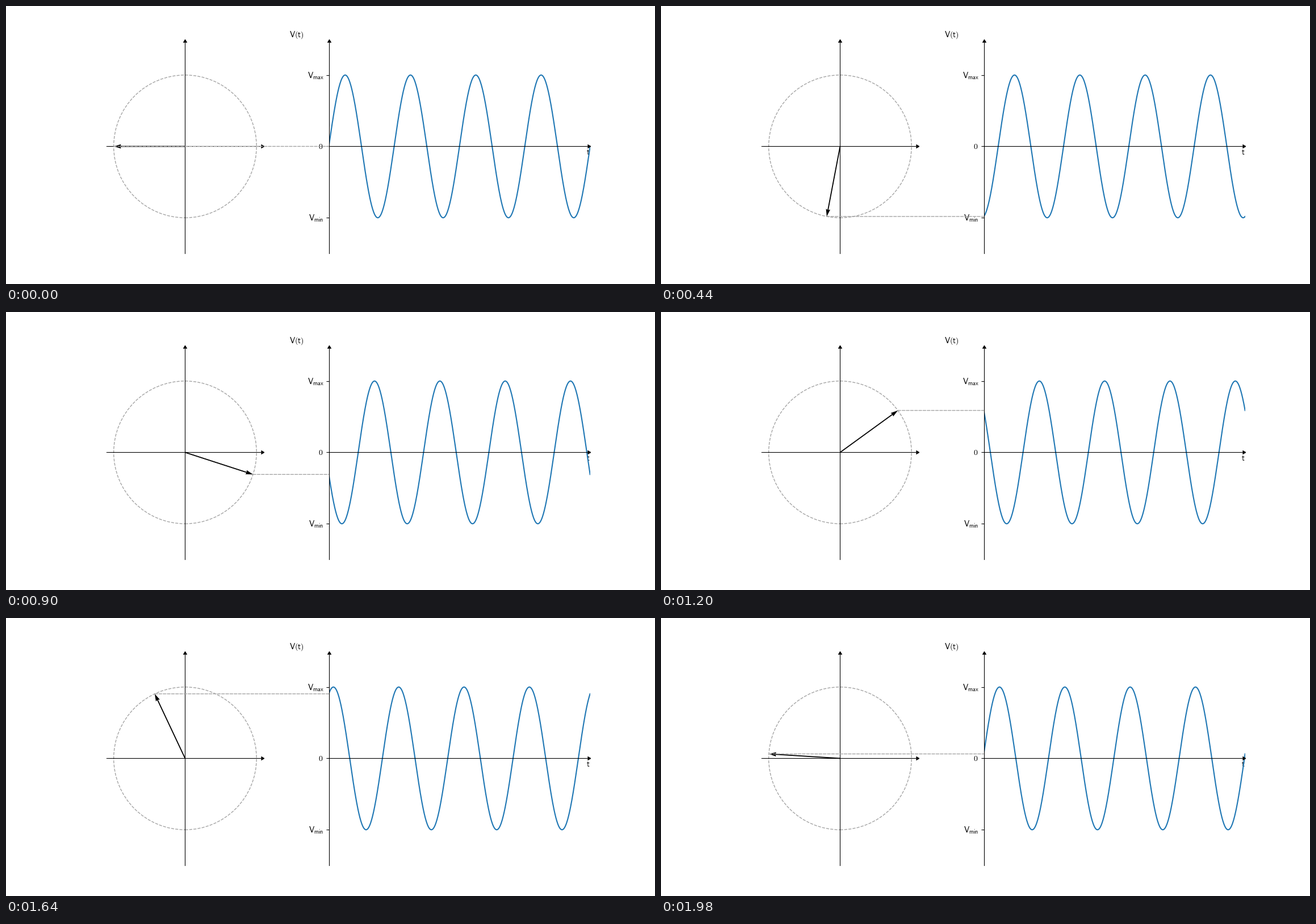
Write a matplotlib script that moves like this. It is 1143 px wide and 490 px high and loops after 2 s.

```python
import numpy as np
import matplotlib.pyplot as plt
from matplotlib.animation import FuncAnimation
from matplotlib.patches import Circle, ConnectionPatch

W, H, DPI = 1143, 490, 100
FRAMES, INTERVAL = 100, 20
PERIODS = 4
GRAY = "#a5a5a5"

fig, (left, right) = plt.subplots(
    ncols=2, figsize=(W / DPI, H / DPI), dpi=DPI,
    gridspec_kw=dict(width_ratios=[3, 4], wspace=0.2,
                     left=0.125, right=0.9, bottom=0.11, top=0.88))


def style_axes(ax):
    """Axes through the origin, with small arrowheads at their ends."""
    ax.set_ylim(-1.5, 1.5)
    ax.spines[["top", "right"]].set_visible(False)
    ax.spines[["left", "bottom"]].set_position(("data", 0))
    ax.set_xticks([])
    ax.set_yticks([])
    head = dict(color="black", ms=5, clip_on=False, zorder=3)
    ax.plot(1, 0, marker=5, transform=ax.get_yaxis_transform(), **head)
    ax.plot(0, 1, marker=6, transform=ax.get_xaxis_transform(), **head)


def label(x, y, text, size=10, ha="left"):
    """Sans math text with its baseline at pixel (x, y) from the top left."""
    right.text(x / W, 1 - y / H, rf"$\mathsf{{{text}}}$", size=size, ha=ha,
               va="baseline", math_fontfamily="cm",
               transform=fig.transFigure, zorder=1.5)


left.set_xlim(-1.1, 1.1)
left.set_aspect("equal")
right.set_xlim(0, PERIODS)
for axes in (left, right):
    style_axes(axes)
right.set_yticks([-1, 0, 1], labels=["", "", ""])

label(512, 55, "V(t)", ha="center")
label(1028.7, 262.5, "t", ha="right")
label(558.7, 252.3, "0", ha="right")
for x, y, sub in ((531, 126.7, "max"), (533, 378.3, "min")):
    label(x, y, "V")
    label(x + 9.3, y + 2.1, sub, size=7.4)

left.add_patch(Circle((0, 0), 1, fill=False, ec=GRAY, ls="--", lw=1))
phasor = left.quiver(0, 0, -1, 0, angles="xy", scale_units="xy", scale=1,
                     units="dots", width=1.8, headwidth=4.2, headlength=7.2,
                     headaxislength=6.6, color="black", zorder=3)

t = np.linspace(0, PERIODS, 801)
wave, = right.plot(t, np.sin(2 * np.pi * t), color="tab:blue", lw=1.5)

link = ConnectionPatch((-1, 0), (0, 0), "data", "data", axesA=left,
                       axesB=right, color=GRAY, ls="--", lw=1)
fig.add_artist(link)


def update(i):
    turn = i / FRAMES
    angle = np.pi + 2 * np.pi * turn
    x, y = np.cos(angle), np.sin(angle)
    phasor.set_UVC(x, y)
    wave.set_ydata(np.sin(2 * np.pi * (t - turn)))
    link.xy1 = x, y
    link.xy2 = 0, y
    return phasor, wave, link


anim = FuncAnimation(fig, update, frames=FRAMES, interval=INTERVAL,
                     repeat=True, repeat_delay=0, blit=False)
plt.show()
```
